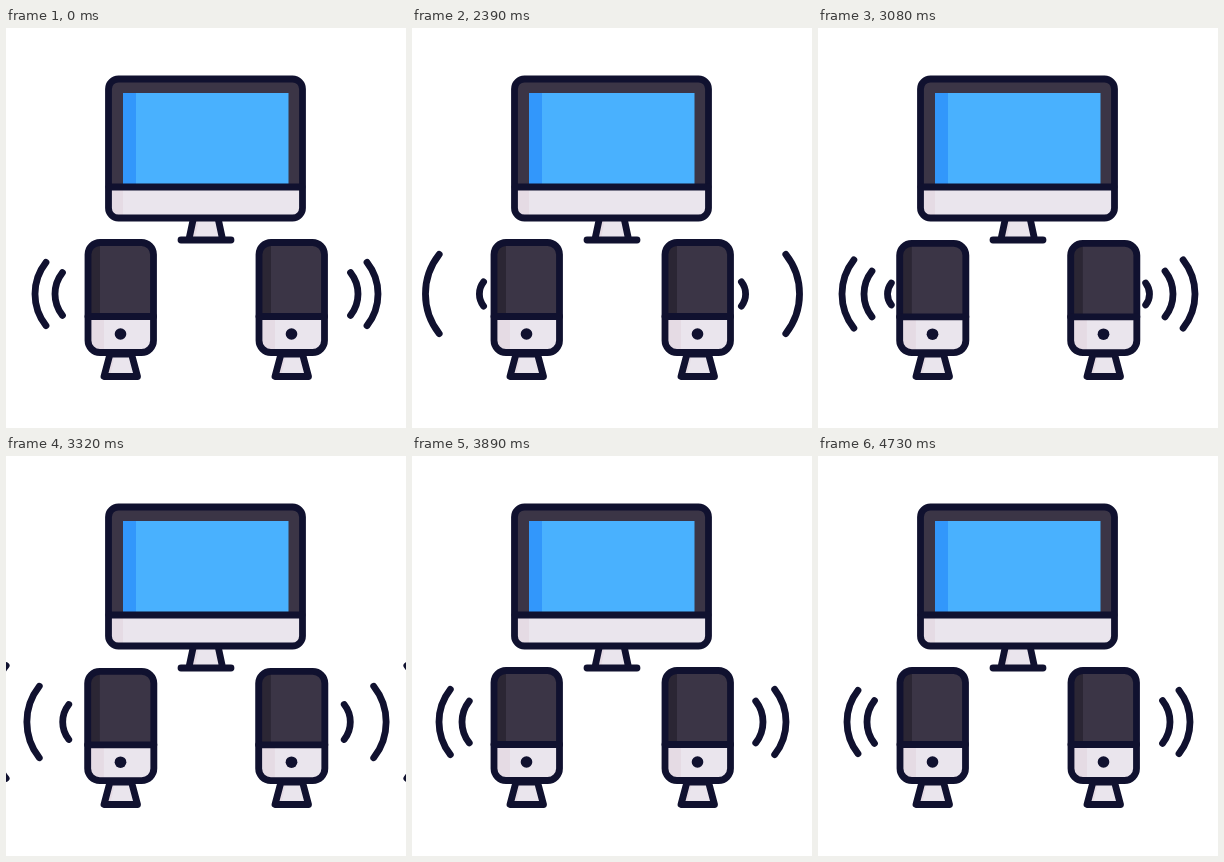
Write an HTML page that moves like this. It is 400 px wide and 400 px high and loops after 4760 ms.

```html
<!DOCTYPE html>
<html lang="en">
<head>
<meta charset="utf-8">
<title>Computer with speakers</title>
<style>
  html, body { margin: 0; width: 100%; height: 100%; overflow: hidden; background: #fff; }
  svg { display: block; width: 100%; height: 100%; }
  .line { fill: none; stroke: #10112f; stroke-width: 6.8; stroke-linecap: round; stroke-linejoin: round; }
  .dark { fill: #3b3546; }
  .light { fill: #eae5ed; }
  .shade { fill: #e5dbe4; }
</style>
</head>
<body>
<svg viewBox="0 0 400 400">
  <defs>
    <clipPath id="case"><rect x="102.500" y="51" width="194" height="139" rx="10"/></clipPath>
    <clipPath id="box"><rect x="82" y="214.500" width="65.500" height="110" rx="12"/></clipPath>
    <g id="foot">
      <path class="light" d="M104 326L98 348.500H131.500L125.500 326Z"/>
      <path class="shade" d="M104 326L98 348.500H104L109 326Z"/>
      <path class="line" d="M104 326L98 348.500H131.500L125.500 326Z"/>
    </g>
    <g id="body">
      <g clip-path="url(#box)">
        <rect class="dark" x="80" y="212" width="70" height="77"/>
        <rect x="80" y="212" width="14" height="77" fill="#2b2634"/>
        <rect class="light" x="80" y="288" width="70" height="40"/>
        <rect class="shade" x="80" y="288" width="18" height="40"/>
      </g>
      <rect class="line" x="82" y="214.500" width="65.500" height="110" rx="12"/>
      <path class="line" d="M82 288.500H147.500"/>
      <circle cx="114.500" cy="306" r="5.800" fill="#10112f"/>
    </g>
    <g id="waves"></g>
  </defs>

  <g>
    <path class="light" d="M187.500 190L183 211H216.500L212 190Z"/>
    <path class="shade" d="M187.500 190L183 211H189L193 190Z"/>
    <path class="line" d="M187.500 190L183 211M212 190L216.500 211M175 212H225"/>
    <g clip-path="url(#case)">
      <rect class="dark" x="100" y="48" width="200" height="112"/>
      <rect class="light" x="100" y="159" width="200" height="34"/>
      <rect class="shade" x="100" y="159" width="17" height="34"/>
    </g>
    <rect x="117" y="65" width="165.500" height="93" fill="#49b1fe"/>
    <rect x="117" y="65" width="13" height="93" fill="#3297fb"/>
    <rect class="line" x="102.500" y="51" width="194" height="139" rx="10"/>
    <path class="line" d="M103 159H296"/>
  </g>

  <use href="#waves"/>
  <use href="#waves" transform="translate(401) scale(-1 1)"/>
  <g class="speaker"><use href="#foot"/><g class="beat"><use href="#body"/></g></g>
  <g class="speaker" transform="translate(171)"><use href="#foot"/><g class="beat"><use href="#body"/></g></g>
</svg>

<script>
const LOOP = 4760, HOLD = 2030, STEP = 30;

// Each wave: [step, size] points; it is only drawn between its first and last step.
const tracks = [
  [[0, 62], [6, 75], [13, 116]],
  [[0, 42], [8, 60], [14, 82], [20, 116]],
  [[8, 10], [17, 40], [25, 63.5], [35, 116]],
  [[16, 10], [25, 42], [36, 67], [45, 116]],
  [[25, 10], [36, 45], [52, 98], [54, 116]],
  [[32, 10], [36, 21.5], [52, 48], [57, 66], [63, 64], [71, 62], [91, 62]],
  [[45, 10], [52, 29], [63, 41], [69, 43.5], [76, 42], [91, 42]]
];

const waves = document.getElementById('waves');
const arcs = tracks.map(() => {
  const path = document.createElementNS('http://www.w3.org/2000/svg', 'path');
  path.setAttribute('class', 'line');
  return waves.appendChild(path);
});
const beats = document.querySelectorAll('.beat');

function slope(track, i) {
  if (i === 0) return 0;
  const a = track[i - 1], b = track[Math.min(i + 1, track.length - 1)];
  return (b[1] - a[1]) / (b[0] - a[0]);
}

// Smooth curve through the points of a track.
function sizeAt(track, step) {
  if (step < track[0][0] || step > track[track.length - 1][0]) return 0;
  let i = 0;
  while (i < track.length - 2 && step >= track[i + 1][0]) i++;
  const [x0, y0] = track[i], [x1, y1] = track[i + 1];
  const span = x1 - x0, u = (step - x0) / span, v = 1 - u;
  return y0 * v * v * (1 + 2 * u) + y1 * u * u * (3 - 2 * u)
    + span * u * v * (slope(track, i) * v - slope(track, i + 1) * u);
}

// Every wave is the same arc, scaled about a point inside the speaker.
function arcPath(size) {
  if (!size) return '';
  const x = 91 - size * 0.823, h = size * 0.51, r = size * 0.823;
  return `M${x} ${266 - h}A${r} ${r} 0 0 0 ${x} ${266 + h}`;
}

function draw(now) {
  const t = now % LOOP;
  const step = t < HOLD ? 0 : Math.floor((t - HOLD) / STEP) + 1;
  arcs.forEach((arc, i) => arc.setAttribute('d', arcPath(sizeAt(tracks[i], step))));

  const pressed = step % 7 === 1 || step % 7 === 2;
  const squash = step > 0 && pressed ? 'translate(114.5 327) scale(1.01 .992) translate(-114.5 -327)' : '';
  beats.forEach(beat => beat.setAttribute('transform', squash));
}

const start = performance.now();
function tick() {
  draw(performance.now() - start);
  requestAnimationFrame(tick);
}
tick();
</script>
</body>
</html>
```
